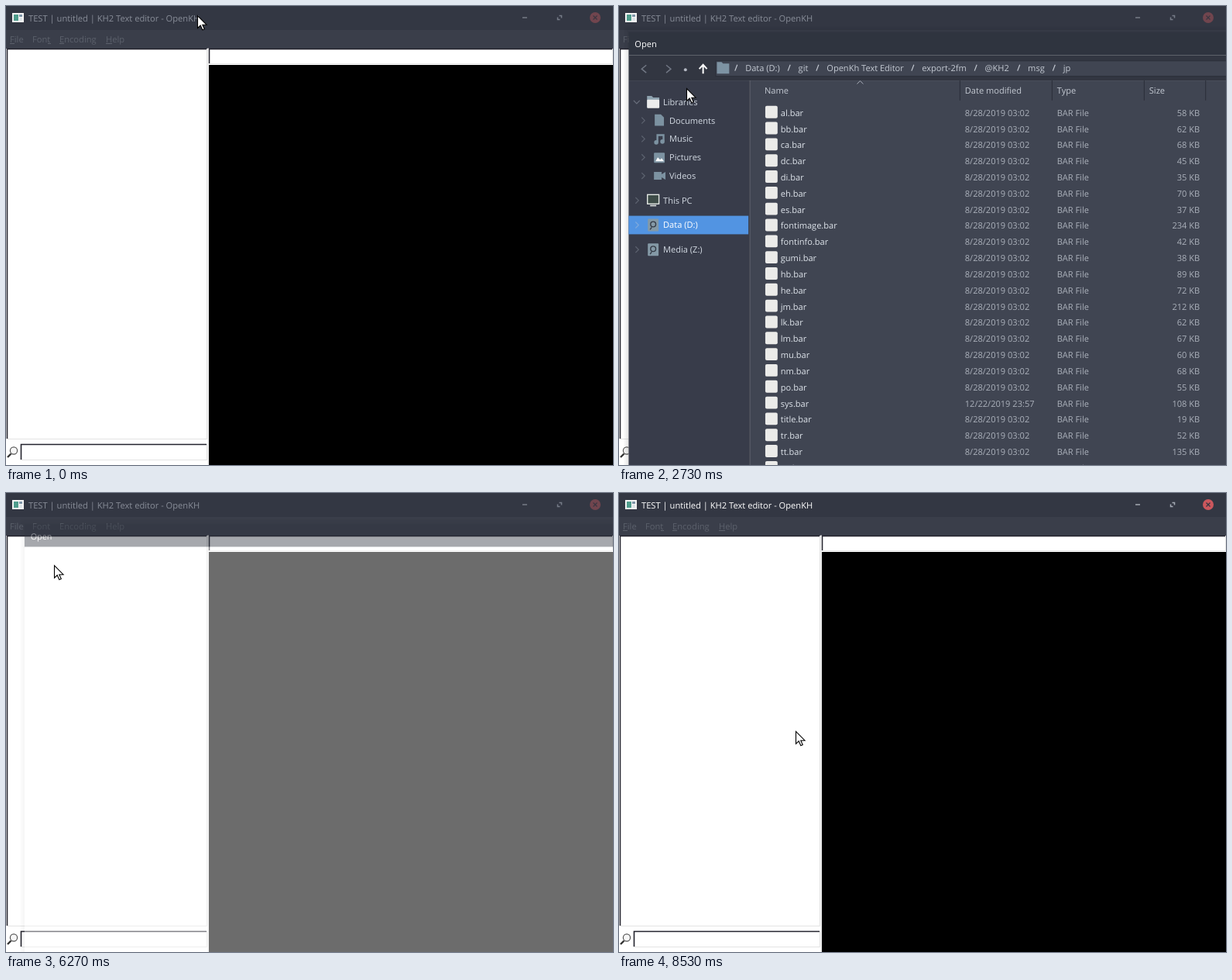
Recreate the animation shown at these times as an HTML page. Size 784 by 592 pixels, loop 8810 ms.

```html
<!DOCTYPE html>
<html lang="en">
<head>
<meta charset="utf-8">
<title>Text editor</title>
<style>
html, body { margin: 0; width: 100%; height: 100%; overflow: hidden; background: #fff; }
svg { display: block; width: 784px; height: 592px; }
text { font: 11.15px "Open Sans", "Noto Sans", sans-serif; white-space: pre; text-rendering: geometricPrecision; }
</style>
</head>
<body>
<svg id="stage" viewBox="0 0 784 592" xmlns="http://www.w3.org/2000/svg"></svg>
<script>
const LOOP = 8810, STEP = 100 / 3;
const stage = document.getElementById('stage');

function add(parent, tag, attrs = {}) {
  const node = document.createElementNS('http://www.w3.org/2000/svg', tag);
  for (const k in attrs) node.setAttribute(k, attrs[k]);
  parent.appendChild(node);
  return node;
}
const group = parent => add(parent, 'g');
const rect = (p, x, y, width, height, fill, more) => add(p, 'rect', { x, y, width, height, fill, ...more });
const path = (p, d, stroke, width = 1, more) =>
  add(p, 'path', { d, fill: 'none', stroke, 'stroke-width': width, ...more });
const label = (p, x, y, str, fill, anchor = 'start') => {
  const node = add(p, 'text', { x, y, fill, 'text-anchor': anchor });
  node.textContent = str;
  return node;
};
const show = (node, on) => node.setAttribute('visibility', on ? 'visible' : 'hidden');
const fade = (node, a) => node.setAttribute('opacity', a);
const clamp = v => Math.max(0, Math.min(1, v));
const ease = v => v * v * (3 - 2 * v);

// Main window
const win = group(stage);
rect(win, 0, 0, 784, 592, '#fff');
rect(win, 0, 0, 784, 31, '#333743');
rect(win, 0, 31, 784, 24, '#3a3e4a');
rect(win, 8, 9, 15, 12, '#f4f4f4');
rect(win, 10, 11, 6, 8, '#4f9c8c');
rect(win, 17, 11, 4, 3, '#7f95a8');
rect(win, 17, 15, 4, 4, '#dfe5e8');
const title = label(win, 29, 20, 'TEST | untitled | KH2 Text editor - OpenKH', '#fff');
const buttons = path(win, 'M667 15H673M714.5 12.5H717.5V15.5M712.5 14.5V17.5H715.5', '#fff', 1.5);
const closeDot = add(win, 'circle', { cx: 761, cy: 15, r: 7 });
const closeX = path(win, 'M758.5 12.5l5 5m0-5l-5 5', '#333743', 1.3);

const MENU_TEXT = '#5c616c';
label(win, 5, 47, 'File', MENU_TEXT);
const fontLabel = label(win, 34, 47, 'Font', MENU_TEXT);
label(win, 69, 47, 'Encoding', MENU_TEXT);
label(win, 129, 47, 'Help', MENU_TEXT);
const underlines = path(win, 'M5 48.5h6M54 48.5h4M69 48.5h6M129 48.5h8', MENU_TEXT);
const edgeA = path(win, 'M29.5 52V32.5H63', '#fff');
const edgeB = path(win, 'M29 52.5H63.5V32', '#fff');

function sunken(x, y, w, h) {
  path(win, `M${x} ${y + h - .5}H${x + w - .5}V${y}`, '#e3e3e3');
  path(win, `M${x + .5} ${y + h - 1}V${y + .5}H${x + w - 1}`, '#23232d', 1.6);
}
sunken(1, 55, 259, 504);
sunken(262, 55, 522, 20);
sunken(19, 565, 241, 21);
path(win, 'M261 54V592', '#dedede');
rect(win, 262, 76, 522, 516, '#000');
path(win, 'M6.5 577.5L2 582', '#333', 2.4);
add(win, 'circle', { cx: 10, cy: 573.5, r: 4.6, fill: '#f7f7f7', stroke: '#555', 'stroke-width': 1.2 });

// Drop-down menu
const menu = group(stage);
rect(menu, 34, 57, 135, 51, '#000', { opacity: .25 });
rect(menu, 35, 58, 135, 51, '#000', { opacity: .12 });
rect(menu, 29, 53, 137, 53, '#f5f6f7');
path(menu, 'M29 105H165.5V53', '#60636a', 1.5);
const items = [['Open font image...', 55, 23, 70], ['Open font info...', 84, 20, 99]].map(([str, y, h, base]) => ({
  y, h,
  bar: rect(menu, 31, y, 134, h, '#5294e2'),
  text: label(menu, 48, base, str, MENU_TEXT)
}));
path(menu, 'M33 79.5H163', '#555860');

// File dialog
const CX = 541, CY = 342, SHRINK = .045;
const EDGE = '#2b2e39', PALE = '#dfe5ec', DIM = '#abb1bb';
const dialog = group(stage);
for (let i = 1; i < 6; i++)
  rect(dialog, 8 - i * 1.3, 31 - i * 1.6, 1066 + i * 2.6, 622 + i * 3.2, '#000', { opacity: .018, rx: i });
rect(dialog, 8, 31, 1066, 31, '#2f343f');
rect(dialog, 8, 61, 1066, 592, '#fff');
label(dialog, 16, 51, 'Open', '#fff');
const body = group(dialog);
rect(body, 8, 61, 1066, 33, '#323641');
path(body, 'M31 74l-6 5l6 5', '#717784', 1.5);
path(body, 'M57 74l6 5l-6 5', '#717784', 1.5);
add(body, 'circle', { cx: 82, cy: 80, r: 2, fill: '#b4b9c3' });
path(body, 'M105 85V74M100 79l5-5.5l5 5.5', '#fff', 2);
rect(body, 121.5, 68.5, 900, 20, '#404552', { stroke: EDGE });

const folder = (x, y, fill) => {
  path(body, `M${x} ${y}h6l2 2h8v13h-16z`, 'none', 0, { fill });
};
folder(123, 70, '#7d93a3');
[[160, 'Data (D:)', 146], [229, 'git', 215], [266, 'OpenKh Text Editor', 252], [390, 'export-2fm', 376],
  [472, '@KH2', 458], [528, 'msg', 514], [574, 'jp', 560]].forEach(([x, str, slash]) => {
  label(body, x, 82, str, '#c3c9d2');
  path(body, `M${slash + .5} 81.5l3-8`, '#c3c9d2', 1.2);
});

// Navigation pane
rect(body, 8, 94, 157, 559, '#383c4a');
rect(body, 165, 94, 1, 559, '#30343f');
rect(body, 8, 270, 156, 24, '#5294e2');
[[53, 122, 'Libraries'], [61, 146, 'Documents'], [61, 170, 'Music'], [61, 194, 'Pictures'], [61, 218, 'Videos'],
  [53, 250, 'This PC'], [53, 282, 'Data (D:)'], [53, 314, 'Media (Z:)']].forEach(([x, y, str]) =>
  label(body, x, y + 4, str, y === 282 ? '#fff' : '#d3dae3'));
const SLATE = '#7c92a1';
folder(32, 114, '#8ea2af');
rect(body, 32, 119, 16, 11, '#ececec', { rx: 1 });
path(body, 'M42 138h8l4 4v11h-12z', 'none', 0, { fill: SLATE });
path(body, 'M45.5 174V165H53.5V173', SLATE, 2.4);
add(body, 'circle', { cx: 44, cy: 174.5, r: 2.8, fill: SLATE });
add(body, 'circle', { cx: 52, cy: 173.5, r: 2.8, fill: SLATE });
rect(body, 41, 188, 14, 13, SLATE, { rx: 1 });
path(body, 'M43 199l3-5l3 3l2-2l3 4z', 'none', 0, { fill: '#fff' });
path(body, 'M41 213h10v3l5-3v10l-5-3v3h-10z', 'none', 0, { fill: SLATE });
rect(body, 32.5, 242.5, 15, 12, '#3e4c48', { stroke: '#e5e9e5', 'stroke-width': 1.4 });
rect(body, 36, 256, 8, 1.6, '#e5e9e5');
[282, 314].forEach(y => {
  rect(body, 33, y - 8, 14, 16, '#8499a6', { rx: 1 });
  add(body, 'circle', { cx: 40, cy: y - 1, r: 3.4, fill: 'none', stroke: '#343a45', 'stroke-width': 1.4 });
  path(body, `M38 ${y + 3}l-2 3`, '#343a45', 1.3);
});
const twigs = group(body);
path(twigs, 'M14.5 120l4 4l4-4', '#6a707d', 1.2);
[146, 170, 194, 218, 250, 282, 314].forEach((y, i) =>
  path(twigs, `M${i < 4 ? 25 : 17} ${y - 4}l4 4l-4 4`, i === 5 ? '#7fa9dc' : '#5d6370', 1.2));

// File list
rect(body, 166, 94, 908, 559, '#404552');
path(body, 'M439.5 94V120M559.5 94V120M679.5 94V120M759.5 94V120', EDGE);
path(body, 'M305.5 98.5l4-4l4 4', '#a9afba');
[[185, 'Name'], [446, 'Date modified'], [566, 'Type'], [686, 'Size']].forEach(([x, str]) =>
  label(body, x, 111, str, '#c3c9d2'));
const rowBar = rect(body, 182, 0, 573, 22, '#3e4b5b');
const files = ('al 58,bb 62,ca 68,dc 45,di 35,eh 70,es 37,fontimage 234,fontinfo 42,gumi 38,hb 89,he 72,jm 212,' +
  'lk 62,lm 67,mu 60,nm 68,po 55,sys 108,title 19,tr 52,tt 135,tw 61').split(',');
files.forEach((entry, i) => {
  const [name, size] = entry.split(' '), y = 140 + 21 * i;
  rect(body, 186, y - 13, 16, 16, '#ebebe9', { rx: 2 });
  label(body, 206, y, name + '.bar', PALE);
  label(body, 446, y, name === 'sys' ? '12/22/2019 23:57' : '8/28/2019 03:02', DIM);
  label(body, 566, y, 'BAR File', DIM);
  label(body, 752, y, size + ' KB', DIM, 'end');
});

const tip = group(body);
rect(tip, 227, 297, 175, 49, '#000', { opacity: .3, rx: 1 });
rect(tip, 223.5, 293.5, 175, 49, '#3f434e', { stroke: '#33363f' });
['Type: BAR File', 'Size: 233 KB', 'Date modified: 8/28/2019 03:02'].forEach((str, i) =>
  label(tip, 229, 307 + 15 * i, str, '#6d727e'));

const cursor = path(stage, 'M.5 .5V16.5L4.2 13L6.8 18.8L9.3 17.7L6.8 12.2H12z', '#000', 1.1, { fill: '#fff' });

// Cursor keys: time, x, y
const moves = [[0, 247, 12], [400, 247, 12], [500, 243, 9], [1200, 42, 36], [1900, 42, 36], [2200, 54, 65],
  [2640, 54, 65], [3080, 228, 283], [4270, 228, 283], [4900, 43, 45], [5200, 43, 45], [5600, 62, 93],
  [6330, 62, 93], [6800, 214, 291], [7000, 225, 309], [7200, 225, 309], [7230, 225, 308], [7970, 225, 308],
  [8130, 227, 307], [8400, 227, 307], [8530, 228, 307], [LOOP, 228, 307]];
function pointer(t) {
  const i = moves.findIndex(m => m[0] > t), a = moves[i - 1], b = moves[i];
  // A hand speeds up quickly and slows down gently
  const p = ease(((t - a[0]) / (b[0] - a[0])) ** .85);
  return [a[1] + (b[1] - a[1]) * p, a[2] + (b[2] - a[2]) * p].map(Math.round);
}

const menus = [[1430, 2370], [4930, 6030]];
const dialogs = [
  { open: 2570, close: 3800, pick: 3670, tip: 3470 },
  { open: 6230, close: 7570, pick: 7430, tip: LOOP }
];
const within = (t, a, b) => t >= a && t < b;

function drawDialog(t, x, y) {
  const d = dialogs.find(o => within(t, o.open, o.close + 230));
  show(dialog, d);
  if (!d) return;
  const age = t - d.open, out = clamp((t - d.close + STEP) / 260);
  const k = 1 - SHRINK * (out ? out : Math.exp(-age / 99) * (age < 500));
  dialog.setAttribute('transform', `translate(${CX} ${CY}) scale(${k}) translate(${-CX} ${-CY})`);
  fade(dialog, out ? 1 - out : clamp(.137 + age / 141));
  fade(body, age >= 130 ? 1 : 0);
  fade(twigs, 1 - clamp((age - 500) / 350));
  fade(tip, t < d.pick ? clamp((t - d.tip + STEP) / 130) : 0);
  fade(rowBar, x > 182 ? 1 : 0);
  rowBar.setAttribute('y', 125 + 21 * Math.floor((y - 125) / 21));
  rowBar.setAttribute('fill', t >= d.pick ? '#47688f' : '#3e4b5b');
}

function draw(ms) {
  // The picture advances at 30 steps a second
  const t = Math.floor((ms + 4) / STEP) * STEP + 4;
  const [x, y] = pointer(Math.min(t, LOOP - 1));
  cursor.setAttribute('transform', `translate(${x} ${y})`);

  const active = within(t, 1430, 2400) || within(t, 3800, 6070) || t >= 7570;
  title.setAttribute('fill', active ? '#fff' : '#888d98');
  buttons.setAttribute('stroke', active ? '#a4a9b3' : '#767b87');
  closeDot.setAttribute('fill', active ? '#cc575d' : '#71454e');
  closeX.setAttribute('stroke', active ? '#333743' : '#3c3742');
  show(underlines, t < 1430 || t >= 8430);

  const m = menus.find(([a, b]) => within(t, a, b));
  const hover = !m && x >= 29 && x < 64 && y >= 32 && y < 53;
  show(edgeA, m || hover);
  show(edgeB, m || hover);
  edgeA.setAttribute('stroke', m ? '#23262f' : '#fff');
  edgeB.setAttribute('stroke', m ? '#fff' : '#23262f');
  fontLabel.setAttribute('transform', m ? 'translate(1 1)' : '');
  show(menu, m);
  fade(menu, m ? clamp((t - m[0]) / 200) : 0);
  for (const it of items) {
    const on = y >= it.y && y < it.y + it.h;
    fade(it.bar, on ? 1 : 0);
    it.text.setAttribute('fill', on ? '#fff' : MENU_TEXT);
  }
  drawDialog(t, x, y);
}

const start = performance.now();
function tick() {
  draw((performance.now() - start) % LOOP);
  requestAnimationFrame(tick);
}
tick();
</script>
</body>
</html>
```
